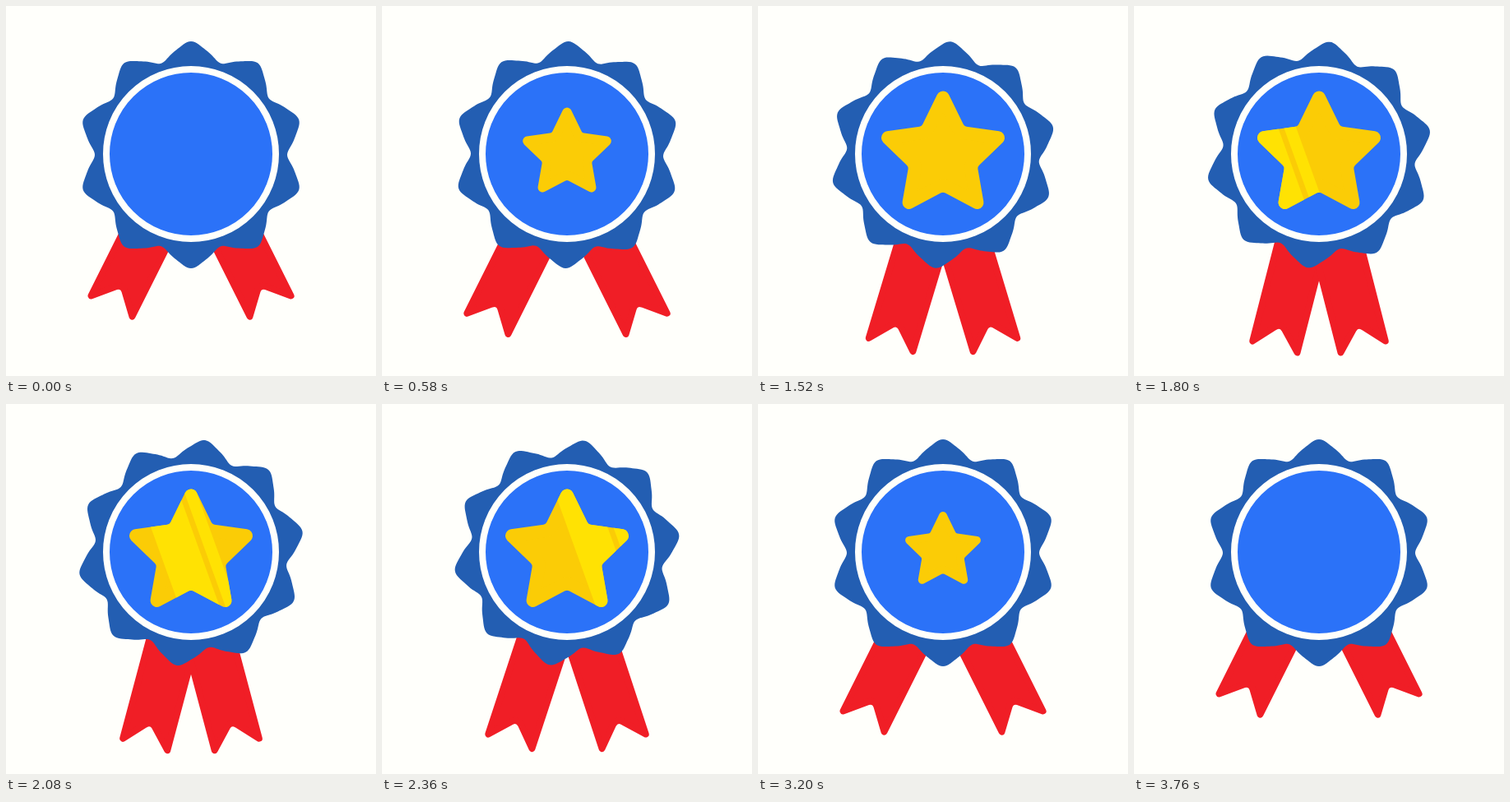
An HTML page that plays this animation: 450x450 px, repeating every 3860 ms.

```html
<!DOCTYPE html>
<html lang="en">
<head>
<meta charset="utf-8">
<title>Award rosette</title>
<style>
  html, body { margin: 0; width: 100%; height: 100%; overflow: hidden; background: #fffffb; }
  svg { display: block; width: 100vw; height: 100vh; }
  .ribbon { fill: #f01e26; stroke: #f01e26; stroke-width: 8; stroke-linejoin: round; }
  .star { stroke-width: 16; stroke-linejoin: round; }
</style>
</head>
<body>
<svg viewBox="0 0 450 450">
  <defs>
    <path id="tail" class="ribbon" d="M-28 64H28V240.5L6 217Q0 211 -6 217L-28 240.5Z"/>
    <mask id="starMask" maskUnits="userSpaceOnUse" x="130" y="80" width="190" height="190">
      <path class="star" fill="#fff" stroke="#fff"/>
    </mask>
  </defs>
  <use id="left" href="#tail"/>
  <use id="right" href="#tail"/>
  <path id="rosette" fill="#235eb2"/>
  <circle cx="225" cy="180" r="103" fill="#2b72f8" stroke="#fffffb" stroke-width="8"/>
  <g id="star">
    <path class="star" fill="#fbcc06" stroke="#fbcc06"/>
    <g mask="url(#starMask)">
      <path id="shine" fill="#ffe203" d="M-36 80H13L85 280H36ZM20 80H35L107 280H92Z"/>
    </g>
  </g>
</svg>
<script>
const LOOP = 3860, LAST = 80;
const $ = id => document.getElementById(id);
const clamp = v => Math.min(1, Math.max(0, v));
const ease = (v, a, b) => (1 - Math.cos(Math.PI * clamp((v - a) / (b - a)))) / 2;
// Rises between a and b, falls between c and d
const inOut = (v, a, b, c, d) => ease(v, a, b) - ease(v, c, d);

const polar = (a, r) => [r * Math.sin(a), -r * Math.cos(a)];
const mix = (p, q, k) => p.map((v, i) => v + (q[i] - v) * k);
const text = p => p.map(v => v.toFixed(2)).join(' ');

function rosettePath() {
  const pts = [];
  for (let i = 0; i < 360; i++) {
    const a = i * Math.PI / 180;
    pts.push(text(polar(a, 127.5 + 9.7 * Math.cos(10 * a) + 0.8 * Math.cos(30 * a))));
  }
  return 'M' + pts.join('L') + 'Z';
}

// Five points with softened inner corners
function starPath() {
  let d = '';
  for (let i = 0; i < 5; i++) {
    const a = i * 2 * Math.PI / 5, step = Math.PI / 5;
    const tip = polar(a, 70.5), inner = polar(a + step, 35), next = polar(a + 2 * step, 70.5);
    d += `${i ? 'L' : 'M'}${text(tip)}L${text(mix(inner, tip, 0.15))}` +
         `Q${text(inner)} ${text(mix(inner, next, 0.15))}`;
  }
  return d + 'Z';
}

$('rosette').setAttribute('d', rosettePath());
for (const s of document.querySelectorAll('.star')) {
  s.setAttribute('d', starPath());
  s.setAttribute('transform', 'translate(225 182)');
}

// Steps come in threes, lasting 20, 20 and 100 ms
function stepAt(ms) {
  const t = ms + 20, r = t % 140;
  const sub = r < 20 ? 0 : r < 40 ? 1 : 2;
  return Math.min(LAST, 3 * Math.floor(t / 140) + sub - 1);
}

// Near-constant spin with short ramps at both ends
function spin(n) {
  const start = 12, end = 68, ramp = 4.4, speed = 324 / (end - start - ramp);
  const t = Math.min(end, Math.max(start, n)) - start, len = end - start;
  if (t < ramp) return speed * t * t / (2 * ramp);
  if (t > len - ramp) return 324 - speed * (len - t) ** 2 / (2 * ramp);
  return speed * (t - ramp / 2);
}

function draw(n) {
  const swing = 25.1 - 12.4 * inOut(n, 13.5, 40, 40, 66);
  const lift = -21 * (1 - inOut(n, 0, 12, 68, 80));
  const pull = -13 * (1 - inOut(n, 12, 22, 58, 68));
  const place = (id, side) => $(id).setAttribute('transform',
    `translate(225 ${180 + lift}) rotate(${side * swing}) translate(0 ${pull}) rotate(${side * 1.5} 0 240)`);
  place('left', 1);
  place('right', -1);

  $('rosette').setAttribute('transform', `translate(225 181) rotate(${spin(n)})`);

  const size = inOut(n, 4, 18, 62, 76);
  $('star').setAttribute('visibility', size > 0.001 ? 'visible' : 'hidden');
  $('star').setAttribute('transform',
    `translate(225 174.5) scale(${Math.max(size, 0.001)}) translate(-225 -174.5)`);

  $('shine').setAttribute('visibility', n > 32 && n < 60 ? 'inherit' : 'hidden');
  $('shine').setAttribute('transform', `translate(${187 + 8.2 * (n - 44)} 0)`);
}

const begin = performance.now();
function tick() {
  draw(stepAt((performance.now() - begin) % LOOP));
  requestAnimationFrame(tick);
}
tick();
</script>
</body>
</html>
```
